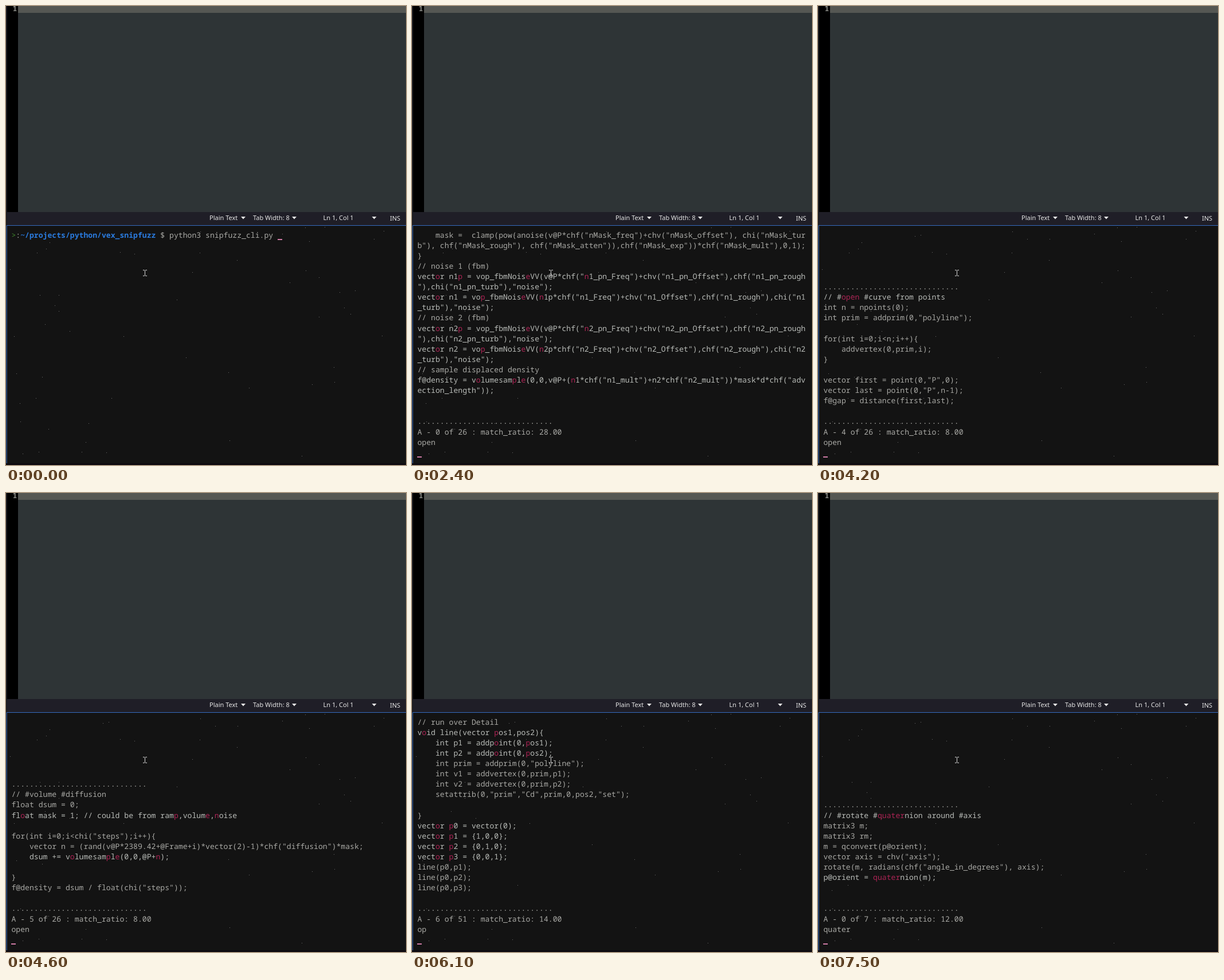
An HTML page that plays this animation: 698x802 px, repeating every 8000 ms.

```html
<!DOCTYPE html>
<html lang="en">
<head>
<meta charset="utf-8">
<title>Snippet search</title>
<style>
html, body { margin: 0; width: 100%; height: 100%; overflow: hidden; background: #131313; }
svg { position: absolute; left: 0; top: 0; }
.mono, pre { font-family: "Noto Sans Mono", "DejaVu Sans Mono", monospace; font-size: 13.14px; text-rendering: geometricPrecision; }
.bar { font: 11px "Noto Sans", "Open Sans", sans-serif; fill: #e6e6e6; }
#term { position: absolute; left: 9.4px; top: 390.6px; height: 398.2px; overflow: hidden; display: flex; align-items: flex-end; }
pre { margin: 0; width: calc(86ch + 2px); line-height: 18.1px; color: #a9a9a5; white-space: pre-wrap; line-break: anywhere; font-variant-ligatures: none; }
pre i { font-style: normal; color: #b9bcb8; }
pre b { font-weight: normal; color: #ad2455; }
pre u { display: inline-block; width: 1ch; height: 2px; vertical-align: -4px; background: #d07ba6; }
.sign { color: #3f8a2c; }
.path { color: #2a7bde; font-weight: bold; }
</style>
</head>
<body>
<svg width="698" height="802">
  <rect width="698" height="384" fill="#1b1b20"/>
  <rect x="2" width="19" height="360" fill="#000"/>
  <rect x="21" width="677" height="360" fill="#2e3436"/>
  <rect x="21" width="677" height="12" fill="#555753"/>
  <text class="mono" x="11.5" y="9" font-weight="bold" fill="#868782">1</text>
  <rect x="2" y="360" width="696" height="23" fill="#1f1e27"/>
  <g class="bar">
    <text x="355" y="374">Plain Text</text>
    <text x="431" y="374">Tab Width: 8</text>
    <text x="553.5" y="374">Ln 1, Col 1</text>
    <text x="670" y="375">INS</text>
    <path d="M410 368h8l-4 4.5zM499 368h8l-4 4.5zM638.5 368h8l-4 4.5z"/>
  </g>
  <path d="M698 383.5H1.2V799" fill="none" stroke="#356bc0"/>
  <rect y="799" width="698" height="3" fill="#0d0a10"/>
  <path id="stars" stroke="#6c6c6c"/>
</svg>
<div id="term"><pre id="screen"></pre></div>
<svg width="698" height="802">
  <path d="M239 461.5h2.5l1 1l1-1h2.5M242.5 462v9M239 471.5h2.5l1-1l1 1h2.5" fill="none" stroke="#dcdcdc"/>
</svg>
<script>
const stars = [
  76,413, 70,424, 54,431, 169,402, 179,400, 199,430, 224,433, 338,431, 339,394, 365,407,
  404,407, 403,444, 325,465, 7,460, 59,505, 92,505, 85,523, 92,533, 68,556, 111,568,
  14,577, 205,577, 298,513, 314,614, 388,640, 424,667, 495,483, 523,462, 546,474, 582,500,
  609,497, 590,527, 601,538, 546,543, 656,576, 572,631, 534,661, 573,657, 529,411, 482,398,
  522,387, 556,386, 642,407, 659,393, 18,642, 63,648, 52,685, 24,694, 184,685, 25,726,
  74,739, 144,729, 139,762, 132,779, 175,780, 57,779, 29,782, 390,759, 516,786];
let dots = '';
for (let i = 0; i < stars.length; i += 2) dots += `M${stars[i]} ${stars[i + 1] + .5}h1`;
document.getElementById('stars').setAttribute('d', dots);

const noise = n => `// noise ${n} (fbm)
vector n${n}p = vop_fbmNoiseVV(v@P*chf("n${n}_pn_Freq")+chv("n${n}_pn_Offset"),chf("n${n}_pn_rough"),chi("n${n}_pn_turb"),"noise");
vector n${n} = vop_fbmNoiseVV(n${n}p*chf("n${n}_Freq")+chv("n${n}_Offset"),chf("n${n}_rough"),chi("n${n}_turb"),"noise");
`;

const advect = `    mask =  clamp(pow(anoise(v@P*chf("nMask_freq")+chv("nMask_offset"), chi("nMask_turb"), chf("nMask_rough"), chf("nMask_atten")),chf("nMask_exp"))*chf("nMask_mult"),0,1);
}
${noise(1)}${noise(2)}// sample displaced density
f@density = volumesample(0,0,v@P+(n1*chf("n1_mult")+n2*chf("n2_mult"))*mask*d*chf("advection_length"));
`;

const xform = `//Depending on the value of c,
//returns the translate (c=0), rotate (c=1), or scale (c=2)
//component of the transform (xform)
//
matrix xform = primintrinsic(1, "packedfulltransform", i@ptnum);
//matrix xform = primintrinsic(1, "transform", i@ptnum);

#define XFORM_SRT       0  // Scale Rotate Translate
#define XFORM_XYZ       0 // Rx Ry Rz

int trs = XFORM_XYZ; //Transform Order
int xyz = XFORM_SRT; //Rotation Order
vector p = v@P; //pivot for crack/extracting transforms
vector translate = cracktransform(trs, xyz, 0 , p, xform);
vector rotate    = cracktransform(trs, xyz, 1 , p, xform);
vector scale    = cracktransform(trs, xyz, 2 , p, xform);
`;

const grow = `// grow a curve from each point
int steps = chi("steps");
float len = chf("length");
vector pos = v@P;
vector dir = normalize(v@N);
int pr = addprim(0,"polyline");

for(int i=0;i<steps;i++){
    float t = float(i)/(steps-1);
    vector off = curlnoise(pos*chf("freq")+chv("offset"))*chf("amp")*chramp("shape",t);
    pos += (dir*len/steps)+off;
    int pt = addpoint(0,pos);
    setpointattrib(0,"pscale",pt,chramp("pscale",t));
    addvertex(0,pr,pt);
}

removepoint(0,@ptnum);`;

const curve = `// #open #curve from points
int n = npoints(0);
int prim = addprim(0,"polyline");

for(int i=0;i<n;i++){
    addvertex(0,prim,i);
}

vector first = point(0,"P",0);
vector last = point(0,"P",n-1);
f@gap = distance(first,last);`;

const diffuse = `// #volume #diffusion
float dsum = 0;
float mask = 1; // could be from ramp,volume,noise

for(int i=0;i<chi("steps");i++){
    vector n = (rand(v@P*2389.42+@Frame+i)*vector(2)-1)*chf("diffusion")*mask;
    dsum += volumesample(0,0,@P+n);

}
f@density = dsum / float(chi("steps"));`;

const sphere = `// #group of points inside a soft bounding sphere
vector center = chv("center");
float radius = chf("radius");
float d = distance(v@P,center);

int open = d<radius;
if(open){
    setpointgroup(0,"inside",@ptnum,1);
}

f@dist = fit(d,0,radius,1,0);
v@Cd = chramp("color",f@dist);`;

const lines = `// run over Detail
void line(vector pos1,pos2){
    int p1 = addpoint(0,pos1);
    int p2 = addpoint(0,pos2);
    int prim = addprim(0,"polyline");
    int v1 = addvertex(0,prim,p1);
    int v2 = addvertex(0,prim,p2);
    setattrib(0,"prim","Cd",prim,0,pos2,"set");

}
vector p0 = vector(0);
vector p1 = {1,0,0};
vector p2 = {0,1,0};
vector p3 = {0,0,1};
line(p0,p1);
line(p0,p2);
line(p0,p3);`;

const orient = `// #orient copies with a #quaternion
vector up = {0,1,0};
vector dir = normalize(v@N);

matrix3 m = maketransform(dir,up);
vector4 q = quaternion(m);

float angle = radians(chf("angle"));
vector axis = chv("axis");
vector4 spin = quaternion(angle,axis);

// blend both
float amt = chf("amount");
vector4 r = qmultiply(q,spin);
p@orient = slerp(q,r,amt);
v@up = qrotate(p@orient,up);
`;

const turn = `// #rotate #quaternion around #axis
matrix3 m;
matrix3 rm;
m = qconvert(p@orient);
vector axis = chv("axis");
rotate(m, radians(chf("angle_in_degrees"), axis);
p@orient = quaternion(m);
`;

const cursor = '<u></u>', rule = '.'.repeat(30);

// Fuzzy match: mark the letters of the query, in order, within each line
function mark(code, query) {
  const fuzzy = new RegExp([...query].map(c => `(${c})`).join('(.*?)'));
  return code.replace(/</g, '&lt;').split('\n').map(line => {
    if (!fuzzy.test(line)) return line;
    const hit = line.replace(fuzzy, (...g) =>
      g.slice(1, 2 * query.length).map((s, i) => i % 2 ? s : `<b>${s}</b>`).join(''));
    return `<i>${hit}</i>`;
  }).join('\n');
}

const result = (code, query, n, total, ratio, typed = '') =>
  `${rule}\n${mark(code, query)}\n\n${rule}\nA - ${n} of ${total} : match_ratio: ${ratio}.00\n${query}\n${typed}${cursor}`;
const empty = typed => `${rule}${rule}\nA - 0 of 0 : match_ratio:\n\n${typed}${cursor}`;
const prompt = '<span class="sign">&gt;</span>:<span class="path">~/projects/python/vex_snipfuzz</span> $ python3 snipfuzz_cli.py ';

const states = [
  [0, prompt + cursor + '\n'.repeat(21) + ' '],
  [600, prompt + '\n' + cursor + '\n'.repeat(20) + ' '],
  [1600, cursor + '\n'.repeat(21) + ' '],
  [1700, empty('')],
  [2300, result(advect, 'open', 0, 26, 28)],
  [3600, result(xform, 'open', 1, 26, 12)],
  [3900, result(grow, 'open', 2, 26, 10)],
  [4000, result(grow, 'open', 3, 26, 10)],
  [4200, result(curve, 'open', 4, 26, 8)],
  [4500, result(diffuse, 'open', 5, 26, 8)],
  [5100, result(sphere, 'open', 6, 26, 8)],
  [5400, result(sphere, 'open', 6, 26, 8, '^[[B^[[B')],
  [5600, result(sphere, 'open', 6, 26, 8)],
  [6100, result(lines, 'op', 6, 51, 14)],
  [6300, empty('')],
  [6800, empty('q')],
  [7000, result(orient, 'quat', 0, 9, 8)],
  [7500, result(turn, 'quater', 0, 7, 12)]
];

const screenEl = document.getElementById('screen');
let shown;
function draw() {
  const t = performance.now() % 8000;
  const state = states.findLast(s => s[0] <= t);
  if (state !== shown) screenEl.innerHTML = (shown = state)[1];
  requestAnimationFrame(draw);
}
draw();
</script>
</body>
</html>
```
